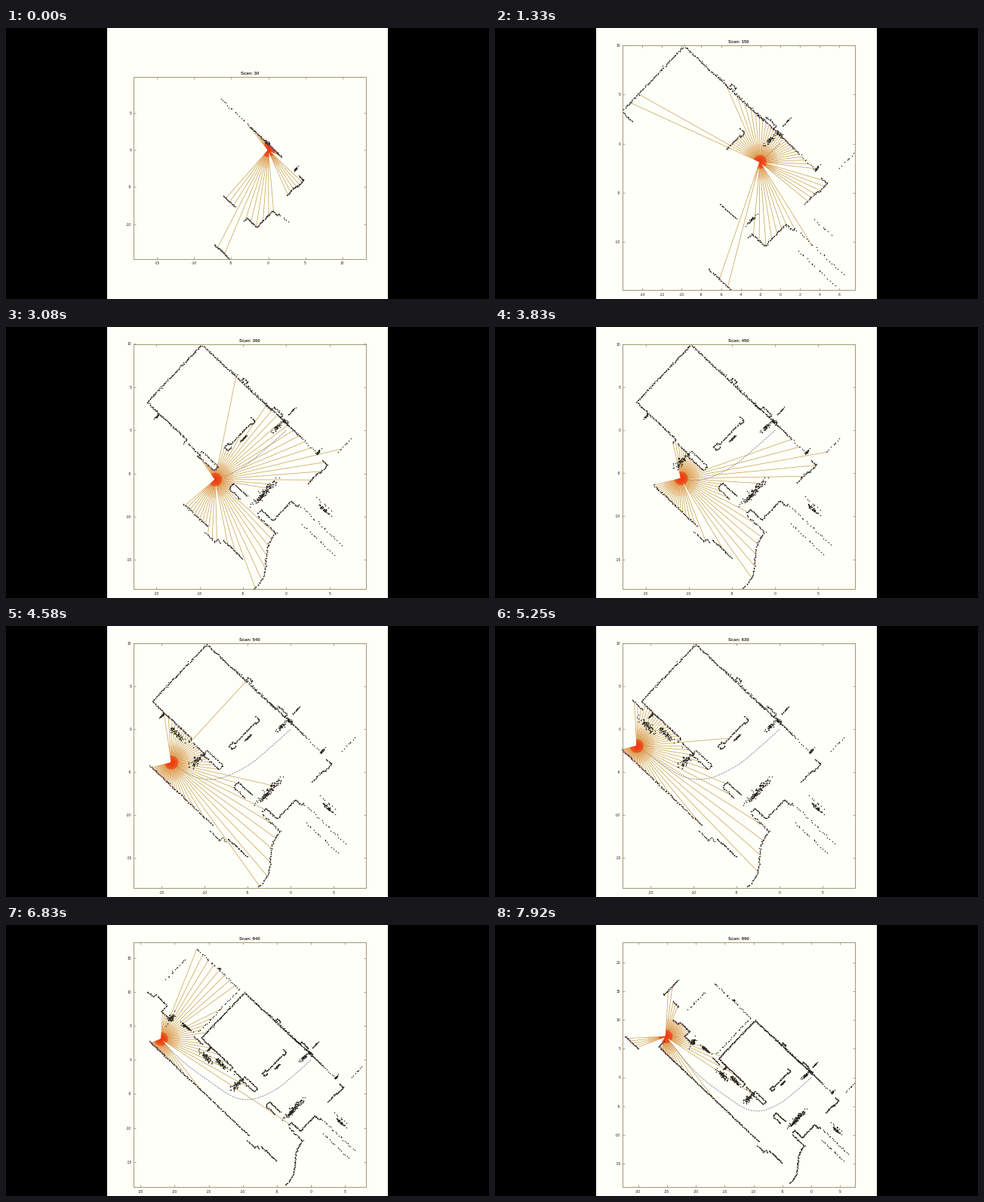
These frames come from a looping animation (640x360 px, 8 s). A matplotlib script:

```python
import numpy as np
import matplotlib.pyplot as plt
from matplotlib.animation import FuncAnimation
from matplotlib.collections import LineCollection
from matplotlib.patches import Rectangle

W, H, FRAMES, LOOP = 640, 360, 96, 8000
PAPER, AXIS, INK = "#fffffa", "#8d8753", "#26241c"
LEFT, RIGHT = 169, 476.5
rng = np.random.default_rng(7)

# The building is skewed: walls run along U or V only.
TILT = np.radians(43.5)
U = np.array([np.cos(TILT), -np.sin(TILT)])
V = np.array([np.sin(TILT), np.cos(TILT)])

# Walls: first and last step of discovery, start, then lengths along U, V, U, ...
ROOM = [
    (1, 1, -2.4, 3.1, 5.8),
    (1, 1, 4.1, -3.4, .9, -1.3, -.2, -1.8),
    (1, 1, -3.3, -9.6, 0, .6, 1.8, 3.1, .9, .35),
    (1, 1, -6.1, -6.1, 2.2),
    (1, 1, -7.3, -12.7, 3.1),
    (2, 4, -9.7, 9.9, 11),
    (2, 2, -5.2, 5.8, 0, .4, .7, -.3),
    (2, 2, -1.6, 2.5, 0, .3, 1.3, -.5),
    (2, 8, -4.1, 1.6, .7, -.6, -.2, -3.4, -.3, -.7, .6, .6),
    (3, 4, -9.75, 9.95, 0, -9.2),
    (4, 9, -16, 3.2, 6.2, -.6),
]
HALL = [
    (8, 33, -9, -11.2, -24, 1.3),
    (8, 8, -11.4, -1.5, 2),
    (11, 11, -6.1, -6.1, 0, -.8, 1.9),
    (11, 11, -3.3, -9.9, 2.8),
    (12, 12, -10.3, -3.05, 0, .85, 2.5, -.7, -2.5),
    (12, 12, -9.4, -11.8, 1.6, .4, .6),
    (21, 21, -17.2, 3.5, 1.7),
    (22, 22, -19, 5.2, .4, .5),
    (28, 28, -24, 10.1, 1.2, .5, 2.3, -1.2, 1.6),
    (29, 29, -25.7, 14.6, .3, 3.6),
    (29, 29, -24, 13.2, 1.3),
    (30, 30, -32.3, 7.2, 3.2),
]
SPARSE = [
    (1, 1, -6.6, 7.1, 5.8),
    (1, 2, 1.75, -.9, 2.6),
    (0, 4, 1.6, -8.7, 6.5),
    (3, 3, 5.9, -2.6, 0, 2.3),
    (4, 4, 1.6, -10.7, 5.4),
    (4, 4, 3.4, -7.6, 2.4),
    (6, 6, -3.7, -8.2, 0, 3.2),
    (26, 28, -16.5, 4.1, 0, 8.7, -8.6),
    (28, 28, -21.4, 11.8, 0, 4.3),
]
# Loose clutter: step, centre, spread along V and U
CLUTTER = [
    (1, -.2, 1.05, .1, .25), (1, 3.7, -2.5, .2, .05), (2, -1.1, .35, .35, .12),
    (2, .7, 2.3, .4, .02), (3, -3, -7.8, .4, .05), (6, -2.5, -7.2, 1, .2),
    (6, 4.4, -9.2, .1, .5), (7, -4.9, -.9, .3, .06), (8, -15, 1.6, .2, .05),
    (13, -10.9, -3.6, .5, .2), (18, -13.2, -.5, .15, .6), (21, -15.4, .5, .2, .6),
    (22, -13.4, 13.4, .05, .05), (27, -20.6, 6.1, .4, .2), (27, -18.4, 5, .1, .6),
]


def corners(start, moves):
    p = [np.array(start)]
    for i, m in enumerate(moves):
        p.append(p[-1] + m * (V if i % 2 else U))
    return np.array(p)


def walk(p, k0, k1, gap):
    """Scatter dots along a wall, discovered from its first corner on."""
    d = np.r_[0, np.cumsum(np.hypot(*np.diff(p, axis=0).T))]
    s = np.arange(0, d[-1], gap)
    s = np.clip(s + rng.uniform(0, gap, len(s)), 0, d[-1])
    xy = np.c_[np.interp(s, d, p[:, 0]), np.interp(s, d, p[:, 1])]
    xy += rng.normal(0, .03 + gap * .08, xy.shape)
    return np.c_[xy, k0 + (k1 - k0) * s / d[-1]]


def pieces(p, k0, k1):
    """Short segments, each with its own step of discovery."""
    out = []
    for a, b in zip(p, p[1:]):
        n = max(1, int(np.hypot(*(b - a))))
        t = np.linspace(0, 1, n + 1)[:, None]
        q = a + (b - a) * t
        out += [(*q[j], *q[j + 1]) for j in range(n)]
    out = np.array(out)
    size = np.hypot(out[:, 2] - out[:, 0], out[:, 3] - out[:, 1])
    done = np.cumsum(size) / size.sum()
    return np.c_[out, k0 + (k1 - k0) * done]


def curb(q0, q1):
    q = np.linspace(q0, q1, 14)
    return np.c_[-2.35 + .2 * q + 1.25 * q**3, -15 + 3.4 * q]


def clutter(step, cx, cy, along, across):
    n = int(200 * np.sqrt(along * across))
    xy = (cx, cy) + rng.normal(0, along, (n, 1)) * V + rng.normal(0, across, (n, 1)) * U
    return np.c_[xy, np.full(n, step)]


WALLS = [(corners(w[2:4], w[4:]), w[0], w[1], gap)
         for group, gap in ((ROOM, .1), (HALL, .13), (SPARSE, .32)) for w in group]
WALLS += [(curb(-1, .47), 7, 7, .12), (curb(.47, .94), 11, 11, .12)]
DOTS = np.vstack([walk(*w) for w in WALLS] + [clutter(*c) for c in CLUTTER])
SEG = np.vstack([pieces(*w[:3]) for w in WALLS])

# Robot poses over the steps
POSE_K = np.array([1, 5, 9, 12, 15, 19, 24, 33])
POSE_X = np.array([0, -2.07, -5.25, -8.2, -10.9, -14.8, -19.1, -25.2])
POSE_Y = np.array([0, -1.87, -4.4, -5.7, -5.6, -3.2, .05, 7.1])
TURN = [0, 27, 25, -8, -30, -36, -46, -46]

# View over the steps: pixels per metre and where the origin sits
VIEW_K = [6, 8, 15, 17, 21, 24, 33]
VIEW_S = [13.07, 11.53, 11.44, 11.4, 11.4, 10.14, 7.65]
VIEW_X = [378, 371.5, 371.2, 377, 377, 392, 419]
VIEW_Y = [153.5, 137.5, 137, 137.3, 137.3, 160.7, 202.5]


def smooth(k, vals):
    m = np.gradient(vals, POSE_K)
    i = np.clip(np.searchsorted(POSE_K, k, "right") - 1, 0, len(POSE_K) - 2)
    h = POSE_K[i + 1] - POSE_K[i]
    t = (k - POSE_K[i]) / h
    return ((2*t**3 - 3*t**2 + 1) * vals[i] + (t**3 - 2*t**2 + t) * h * m[i]
            + (3*t**2 - 2*t**3) * vals[i + 1] + (t**3 - t**2) * h * m[i + 1])


def cast(pos, angles, k):
    """Nearest wall hit along each angle."""
    s = SEG[SEG[:, 4] <= k + .01]
    e = s[:, 2:4] - s[:, :2]
    a = s[:, :2] - pos
    dx, dy = np.cos(angles)[:, None], np.sin(angles)[:, None]
    den = dx * e[:, 1] - dy * e[:, 0]
    den = np.where(abs(den) < 1e-9, 1e-9, den)
    dist = (a[:, 0] * e[:, 1] - a[:, 1] * e[:, 0]) / den
    u = (a[:, 0] * dy - a[:, 1] * dx) / den
    dist = np.where((dist > .02) & (u >= 0) & (u <= 1), dist, np.inf).min(axis=1)
    ok = dist < 23
    return pos + np.c_[np.cos(angles), np.sin(angles)][ok] * dist[ok, None]


def step_at(i):
    return int(np.interp(i, [0, 16, 29, 46, 55, 70, 95],
                         [1, 5.5, 9.5, 15.6, 19.1, 24.3, 33.3]))


def view_at(k):
    if k == 1:
        return 9.83, 347.5, 162.3, 65, 307
    return (*(np.interp(k, VIEW_K, v) for v in (VIEW_S, VIEW_X, VIEW_Y)), 23, 348)


fig = plt.figure(figsize=(6.4, 3.6), dpi=100, facecolor="black")
ax = fig.add_axes([0, 0, 1, 1])


def label(x, y, text, size=3.6, **kw):
    ax.text(x, y, text, fontsize=size, family="Liberation Sans", color="#2c2a20", **kw)


def draw_axes(k, s, ox, oy, top, bottom):
    ax.add_patch(Rectangle((LEFT, top), RIGHT - LEFT, bottom - top,
                           fill=False, ec=AXIS, lw=.6, zorder=5))
    marks = []
    gap = 2 if s > 12 else 5
    for v in range(-8 * gap, 8 * gap + 1, gap):
        x = ox + s * v
        if LEFT < x < RIGHT:
            marks += [[(x, bottom), (x, bottom - 3)], [(x, top), (x, top + 3)]]
            label(x, bottom + 6, str(v), ha="center", va="center")
    for v in range(-30, 31, 5):
        y = oy - s * v
        if top - .8 < y < bottom:
            marks += [[(LEFT, y), (LEFT + 3, y)], [(RIGHT, y), (RIGHT - 3, y)]]
            label(LEFT - 2.5, y, str(v), ha="right", va="center_baseline")
    ax.add_collection(LineCollection(marks, colors=AXIS, linewidths=.5))
    label((LEFT + RIGHT) / 2, top - 2.6, f"Scan: {30 * k}", 4.2, weight="bold",
          ha="center", va="baseline")


def draw_rays(robot, hits):
    d = hits - robot
    r = np.maximum(np.hypot(*d.T), 1e-6)
    for reach, color, lw, alpha in ((999, "#bf9738", .55, .85),
                                    (24, "#f08a3c", .55, .5), (9, "#f03c14", .7, .6)):
        ends = robot + d * np.minimum(1, reach / r)[:, None]
        ax.add_collection(LineCollection([[robot, e] for e in ends], colors=color,
                                         linewidths=lw, alpha=alpha, zorder=2))
    ax.plot(*hits.T, "s", ms=.9, mew=0, color="#8a4a62", zorder=4)


def draw(i):
    ax.clear()
    ax.set(xlim=(0, W), ylim=(H, 0))
    ax.axis("off")
    ax.add_patch(Rectangle((133.5, 0), 372.5, H, fc=PAPER, lw=0, zorder=0))
    k = step_at(i)
    s, ox, oy, top, bottom = view_at(k)

    def to_px(p):
        return np.c_[ox + s * p[:, 0], oy - s * p[:, 1]]

    draw_axes(k, s, ox, oy, top, bottom)
    dots = to_px(DOTS[DOTS[:, 2] <= k])
    inside = ((dots > (LEFT, top)) & (dots < (RIGHT, bottom))).all(axis=1)
    ax.plot(*dots[inside].T, "s", ms=.95, mew=0, color=INK, zorder=3)

    t = np.linspace(1, k, 12 * k)
    path = np.c_[smooth(t, POSE_X), smooth(t, POSE_Y)]
    if k > 1:
        ax.plot(*to_px(path).T, color="#77778c", lw=.55, dashes=(3, 1.5), zorder=1)
    angles = np.radians(np.interp(k, POSE_K, TURN) + np.linspace(-136, 133, 59))
    hits = cast(path[-1], angles, k)
    draw_rays(to_px(path[-1:])[0], to_px(hits))
    return []


anim = FuncAnimation(fig, draw, frames=FRAMES, interval=LOOP / FRAMES,
                     init_func=lambda: [], repeat=True, repeat_delay=0, blit=False)
plt.show()
```
